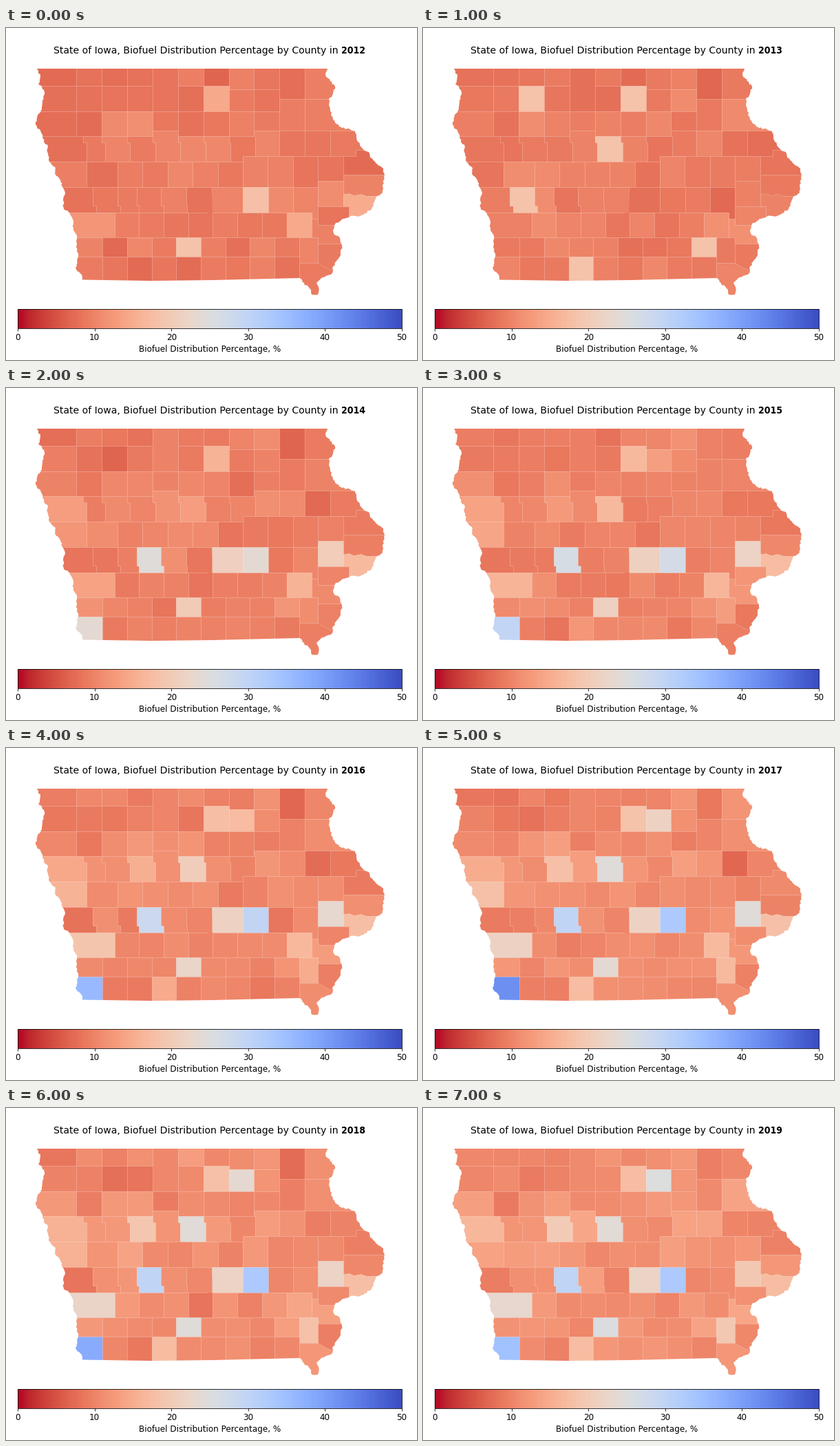
Recreate the animation shown at these times as a matplotlib script. Size 597 by 482 pixels, loop 8 s.

```python
import numpy as np
import matplotlib.pyplot as plt
from matplotlib.animation import FuncAnimation
from matplotlib.cm import ScalarMappable
from matplotlib.collections import PolyCollection
from matplotlib.colors import Normalize
from matplotlib.path import Path

W, H, DPI = 597, 482, 72
FIRST, YEARS = 2012, 8
plt.rcParams["font.family"] = "DejaVu Sans"
rng = np.random.default_rng(4)


def cuts(start, end, n):
    """Evenly spaced county lines on whole pixels."""
    return [int(x) for x in np.round(np.linspace(start, end, n))]


def boxes(edges, top, bottom, mid=None, low=None):
    """Neighbouring counties; below mid their sides jump to the low edges."""
    mid, low = mid or bottom, low or edges
    return [
        [(a, top), (b, top), (b, mid), (d, mid),
         (d, bottom), (c, bottom), (c, mid), (a, mid)]
        for a, b, c, d in zip(edges, edges[1:], low, low[1:])
    ]


def rough(points, amp=1.2):
    """Small random wiggles along a river bank."""
    out = []
    for p, q in zip(np.array(points, float), np.array(points[1:], float)):
        n = max(1, int(np.hypot(*(q - p)) / 2.5))
        out.append(p)
        for k in range(1, n):
            out.append(p + (q - p) * k / n + rng.uniform(-amp, amp, 2))
    return out + [points[-1]]


# County lines, west to east, for each band of rows
north = [0] + cuts(102.2, 434.2, 10) + [W]
upper = [0, 112] + north[2:8]
lower = [0, 117] + cuts(144, 362.4, 7)
middle = [0, 117] + cuts(162, 489.6, 10)
south = [0] + cuts(157.5, 443.5, 9)
border = [0] + cuts(140, 426, 9)
wavy = [(490, 241), (498, 240), (505, 243), (515, 241), (524, 244), (560, 243)]
slant = [(453, 341), (463, 347), (474, 352)]

counties = (
    # three northern rows
    boxes(north[:5], 50, 84) + boxes(north[4:6], 50, 121)
    + boxes(north[5:8], 50, 84) + boxes(north[7:10], 50, 89)
    + boxes(north[9:], 50, 103)
    + boxes(north[:5], 84, 121) + boxes(north[5:8], 84, 121)
    + boxes(north[7:10], 89, 121) + boxes(north[9:], 103, 149)
    + boxes(north[:5], 121, 157) + boxes(north[4:6], 121, 149)
    + boxes(north[5:9], 121, 157) + boxes(north[8:10], 121, 149)
    # fourth row
    + boxes(upper[:5], 157, 194, 166, lower[:5])
    + boxes(upper[4:6], 149, 194, 166, lower[4:6])
    + boxes(upper[5:8], 157, 194, 166, lower[5:8])
    + [[(324, 157), (360, 157), (362, 158), (362, 186), (344, 186),
        (344, 194), (326, 194), (326, 166), (324, 166)]]
    + [[(360, 149), (397, 149), (397, 186), (362, 186), (362, 158), (360, 157)]]
    + boxes([397, 434, 471], 149, 186)
    + [[(471, 149), (560, 149), (560, 177), (508, 177), (508, 186), (471, 186)]]
    # fifth row
    + boxes(middle[:8], 194, 231) + boxes(middle[7:11], 186, 231)
    + boxes(middle[10:], 186, 222)
    + [[(490, 186), (508, 186), (508, 177), (560, 177), (560, 213), (490, 213)]]
    # sixth row
    + boxes([0, 126, 162, 190, 225, 262], 231, 268, 258,
            [0, 131, 166, 193, 229, 263])
    + [[(262, 231), (299, 231), (300, 270), (294, 270), (292, 268),
        (263, 268), (263, 258), (262, 258)]]
    + boxes([299, 344, 381, 417], 231, 268)
    + [[(417, 231), (453, 231), (453, 277), (444, 277), (444, 268), (417, 268)]]
    + boxes(middle[10:], 222, 259)
    + [[(490, 213), (560, 213)] + wavy[::-1]]
    + [wavy + [(560, 280), (498, 280), (498, 259), (490, 259)]]
    + boxes([453, 498], 259, 286)
    # three southern rows
    + boxes(south, 268, 304)
    + [[(444, 277), (453, 277), (453, 286), (500, 286), (500, 313),
        (453, 313), (453, 304), (444, 304)]]
    + boxes(border, 304, 332) + boxes([426, 453], 304, 341)
    + [[(453, 313), (W, 313), (W, 352)] + slant[::-1]]
    + boxes(border, 332, 400)
    + [[(426, 341)] + slant + [(W, 352), (W, 400), (426, 400)]]
)

west_bank = [
    (45, 59), (47, 66), (50, 70), (47, 82), (52, 85), (56, 96), (53, 105),
    (52, 118), (46, 126), (43, 140), (51, 152), (55, 165), (61, 172),
    (60, 180), (64, 195), (72, 203), (71, 211), (79, 221), (82, 231),
    (86, 240), (83, 250), (84, 263), (91, 267), (97, 278), (98, 290),
    (103, 302), (102, 318), (105, 332), (101, 348), (107, 355), (111, 364),
]
south_line = [(111, 365.5), (211, 367), (300, 366), (426, 363)]
east_bank = [
    (426, 363), (431, 369), (441, 378), (444, 387), (453, 387), (454, 376),
    (451, 370), (458, 363), (473, 357), (475, 346), (486, 330), (488, 315),
    (485, 305), (477, 300), (475, 293), (479, 283), (489, 277), (499, 274),
    (516, 272), (531, 263), (537, 246), (547, 239), (549, 217), (548, 204),
    (536, 194), (529, 188), (527, 180), (517, 174), (511, 165), (509, 155),
    (504, 149), (484, 143), (475, 133), (471, 121), (469, 104), (475, 95),
    (478, 85), (468, 73), (464, 68), (467, 59),
]
outline = Path(np.array(rough(west_bank) + south_line + rough(east_bank)))

# Leading counties by a point inside them: share in each key year
KEY_YEARS = (2012, 2014, 2017, 2019)
leaders = {
    (120, 350): (9, 23.5, 42, 34.5),
    (208, 245): (9, 24.5, 30, 30),
    (362, 250): (18, 23.5, 33, 33),
    (320, 250): (10, 21, 21.5, 22),
    (470, 240): (11, 20.5, 24.5, 19.5),
    (265, 318): (18.5, 20, 23.5, 25.5),
    (125, 285): (12, 13.5, 21.5, 23),
    (305, 103): (14.5, 16, 18.5, 17.5),
    (342, 105): (9, 9, 21.5, 25),
    (270, 180): (10.5, 13, 24.5, 24),
    (515, 255): (15, 17, 18, 17.5),
    (426, 285): (14.5, 16, 17, 11),
    (440, 325): (10, 11, 17, 19.5),
    (90, 180): (8, 13, 15, 16.5),
    (90, 212): (9.5, 12, 18, 13.5),
    (198, 180): (9, 10, 18, 20),
    (228, 350): (8.5, 9.5, 17.5, 17.5),
}
# Counties that jump for the second year only
spikes = [(157, 103), (305, 103), (145, 245), (270, 180), (228, 350), (408, 318)]


def county_at(point):
    return next(i for i, c in enumerate(counties) if Path(c).contains_point(point))


# A common level that rises slowly, a lasting trait per county, yearly noise
step = np.arange(YEARS)[:, None]
trait = rng.normal(0, 0.6, len(counties))
noise = rng.normal(0, 0.7, (YEARS, len(counties)))
usual = 8.9 + 0.34 * step + trait * (1 + 0.12 * step) + noise
shares = usual.clip(6.8)
for point, keys in leaders.items():
    shares[:, county_at(point)] = np.interp(FIRST + step[:, 0], KEY_YEARS, keys)
shares[1] = usual[1].clip(7)
for point in spikes:
    shares[1, county_at(point)] = 18.5

fig = plt.figure(figsize=(W / DPI, H / DPI), dpi=DPI, facecolor="white")
ax = fig.add_axes([0, 0, 1, 1])
ax.set(xlim=(0, W), ylim=(H, 0))
ax.axis("off")

# Seams between counties come from antialiased edges alone
norm = Normalize(0, 50)
state = PolyCollection([np.array(c) + 0.5 for c in counties], cmap="coolwarm_r",
                       norm=norm, edgecolors="none", snap=False)
ax.add_collection(state, autolim=False)
state.set_clip_path(outline, ax.transData)

ax.text(69, 37, "State of Iowa, Biofuel Distribution Percentage by County in ",
        fontsize=14, va="baseline")
year = ax.text(487, 37, "", fontsize=14, va="baseline",
               weight="bold", stretch="condensed")

cax = fig.add_axes([17 / W, 1 - 436 / H, 558 / W, 28 / H])
bar = fig.colorbar(ScalarMappable(norm, "coolwarm_r"), cax=cax,
                   orientation="horizontal", ticks=range(0, 51, 10))
bar.ax.tick_params(labelsize=12)
bar.set_label("Biofuel Distribution Percentage, %", fontsize=12)


def update(i):
    state.set_array(shares[i])
    year.set_text(str(FIRST + i))
    return state, year


anim = FuncAnimation(fig, update, frames=YEARS, interval=1000, repeat=True)
plt.show()
```
